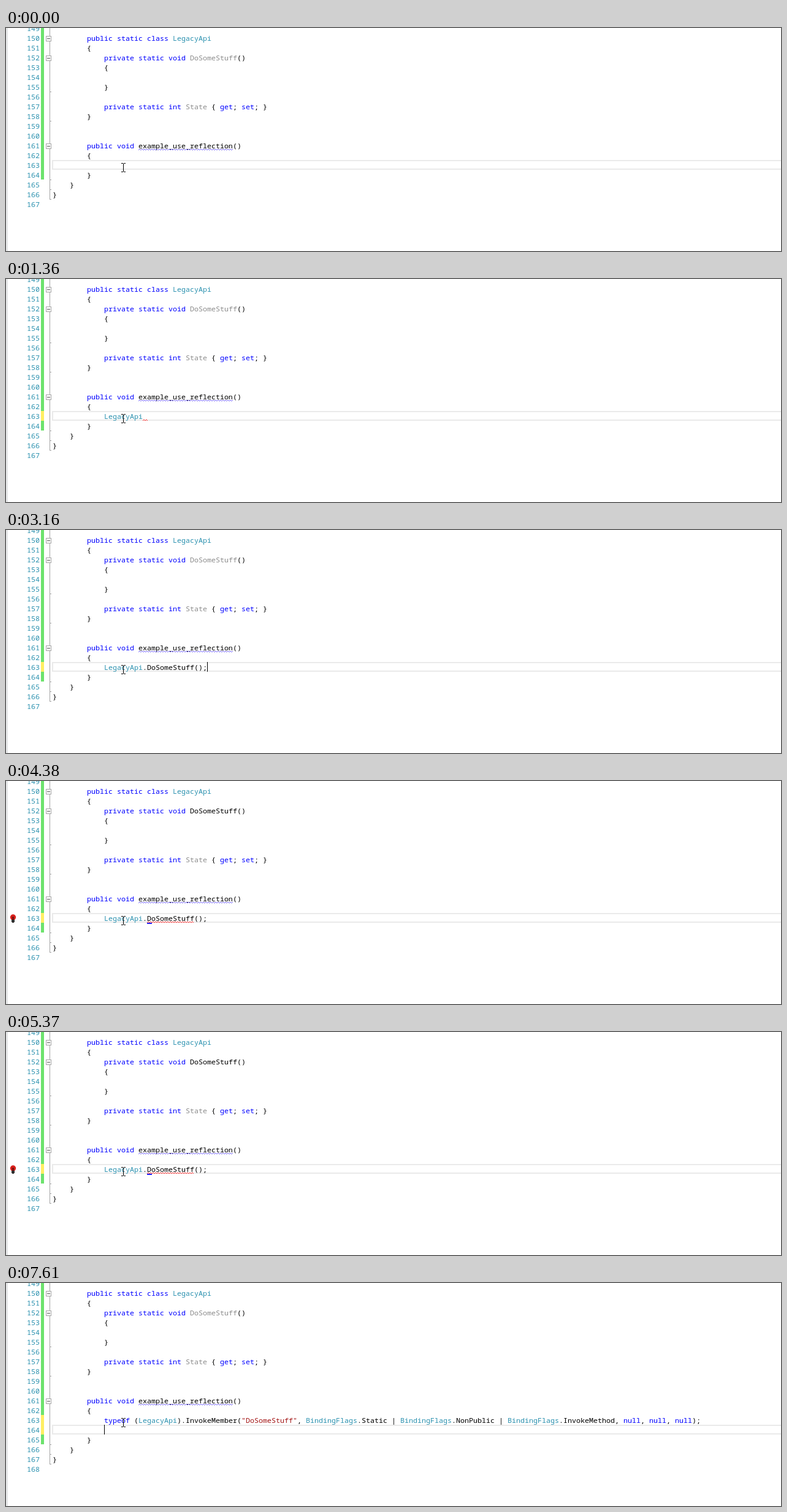
These frames come from a looping animation (1264 px wide and 365 px high, 8000 ms). An HTML page with a canvas:

```html
<!DOCTYPE html>
<html lang="en">
<head>
<meta charset="utf-8">
<title>Code editor</title>
<style>
  html, body { margin: 0; width: 100%; height: 100%; overflow: hidden; background: #fff; }
  canvas { display: block; }
</style>
</head>
<body>
<canvas id="stage" width="1264" height="365"></canvas>
<script>
const ctx = document.getElementById('stage').getContext('2d');
const LOOP = 8000, COL = 7, ROW = 16, LEFT = 76, CODE_X = 160, FIRST = 149;
const CODE_FONT = '11.667px "Noto Sans Mono", monospace';
const LIST_FONT = '11px "Open Sans", sans-serif';
const KEYWORDS = new Set('public private static class void int get set typeof null'.split(' '));
const TYPES = new Set(['LegacyApi', 'BindingFlags']);
const COLORS = { keyword: '#0000ff', type: '#2b91af', unused: '#8c8c8c', string: '#a31515' };

const HEAD = [
  '',
  '        public static class LegacyApi',
  '        {',
  '            private static void DoSomeStuff()',
  '            {',
  '',
  '            }',
  '',
  '            private static int State { get; set; }',
  '        }',
  '',
  '',
  '        public void example_use_reflection()',
  '        {'
];
const TAIL = ['        }', '    }', '}', ''];
const REFLECTION = 'typeof (LegacyApi).InvokeMember("DoSomeStuff", BindingFlags.Static | ' +
  'BindingFlags.NonPublic | BindingFlags.InvokeMethod, null, null, null);';
const CALL = 'LegacyApi.DoSomeStuff();';

const COMPLETIONS = [
  ['class', 'LegacyApi'], ['class', 'LabelExpression'], ['abstract', 'LambdaExpression'],
  ['class', 'LoopExpression'], ['struct', 'DataGridLength'],
  ['class', 'DataGridLengthConverter'], ['enum', 'DataGridLengthUnitType']
];
const FIXES = ["Make 'DoSomeStuff' public", "Make 'DoSomeStuff' internal",
  'Use reflection', "Create method 'DoSomeStuff'"];

// Each step changes only the listed properties; caret is an x position, 0 when hidden.
const STEPS = [
  [0, { code: '', caret: 0, edited: false, popup: '', error: null, bulb: '', used: false, extra: 0 }],
  [120, { code: 'L', caret: 167, edited: true }],
  [250, { code: 'Le', caret: 174 }],
  [390, { popup: 'list' }],
  [510, { code: 'Leg', caret: 181, popup: 'single' }],
  [790, { code: 'Lega', caret: 188 }],
  [930, { code: 'Legac', caret: 195 }],
  [1060, { code: 'LegacyApi', caret: 223, popup: '' }],
  [1360, { caret: 0, error: [223, 231] }],
  [1610, { code: 'LegacyApi.', caret: 230, error: null }],
  [1760, { error: [230, 237] }],
  [1890, { code: 'LegacyApi.D', caret: 237 }],
  [2040, { code: 'LegacyApi.Do', caret: 244 }],
  [2320, { code: 'LegacyApi.DoS', caret: 251 }],
  [2470, { code: 'LegacyApi.DoSo', caret: 258 }],
  [2770, { bulb: 'red' }],
  [2890, { popup: 'member' }],
  [3160, { code: CALL, caret: 328, popup: '', error: null, bulb: '' }],
  [3280, { used: true }],
  [3430, { error: [230, 307], bulb: 'red' }],
  [3840, { caret: 321 }],
  [3980, { caret: 314 }],
  [4110, { caret: 307 }],
  [4250, { caret: 300 }],
  [4380, { caret: 0 }],
  [4690, { caret: 293, popup: 'fixes' }],
  [5370, { caret: 0, popup: '' }],
  [5490, { code: REFLECTION, error: null, bulb: '' }],
  [5640, { used: false }],
  [5950, { caret: 1133 }],
  [6100, { bulb: 'yellow' }],
  [6410, { caret: 160, extra: 1 }],
  [6960, { caret: 0, bulb: '' }],
  [7610, { caret: 160 }]
];

const stateAt = t => Object.assign({}, ...STEPS.filter(s => s[0] <= t).map(s => s[1]));
const rowTop = line => (line - 150) * ROW + 8;

function box(color, x, y, w, h) {
  ctx.fillStyle = color;
  ctx.fillRect(x, y, w, h);
}

function frame(color, x, y, w, h, size = 1) {
  ctx.strokeStyle = color;
  ctx.lineWidth = size;
  ctx.strokeRect(x + size / 2, y + size / 2, w - size, h - size);
}

function label(text, x, y, color, font) {
  ctx.font = font;
  ctx.fillStyle = color;
  ctx.fillText(text, x, y);
}

function tokenColor(word, used) {
  if (word[0] === '"') return COLORS.string;
  if (KEYWORDS.has(word)) return COLORS.keyword;
  if (TYPES.has(word)) return COLORS.type;
  if (word === 'State' || (word === 'DoSomeStuff' && !used)) return COLORS.unused;
  return '#000';
}

function codeLine(text, x, line, used) {
  for (const m of text.matchAll(/"[^"]*"|\w+|[^\w"\s]+/g)) {
    label(m[0], x + m.index * COL, rowTop(line) + 13, tokenColor(m[0], used), CODE_FONT);
  }
}

function squiggle(color, x1, x2, y) {
  ctx.strokeStyle = color;
  ctx.lineWidth = 1;
  ctx.beginPath();
  for (let x = x1, up = 0; x <= x2; x += 2, up ^= 1) ctx.lineTo(x, y + (up ? -1 : 1));
  ctx.stroke();
}

function drawOutline(extra) {
  const gray = '#a5a5a5', shift = extra * ROW;
  box(gray, 71, 0, 1, 281 + shift);
  for (const y of [104, 152, 248 + shift, 264 + shift, 280 + shift]) box(gray, 71, y, 3, 1);
  for (const y of [17, 49, 193]) {
    box('#fff', 65, y - 4, 9, 9);
    frame(gray, 65, y - 4, 9, 9);
    box('#555', 67, y, 5, 1);
  }
}

function drawMargin(s) {
  box('#e6e7e8', 0, 0, 3, 365);
  box('#6ce26c', 57, 0, 5, 248 + s.extra * ROW);
  if (s.edited) box('#ffee62', 57, 216, 5, ROW * (1 + s.extra));
  for (let n = FIRST; n <= 167 + s.extra; n++) {
    label(n, 34, rowTop(n) + 13, COLORS.type, CODE_FONT);
  }
  drawOutline(s.extra);
}

function drawBulb(kind) {
  const red = kind === 'red';
  ctx.fillStyle = red ? '#d8201c' : '#f5c842';
  ctx.beginPath();
  ctx.arc(11.5, 223, 4.7, 0, 7);
  ctx.fill();
  box(red ? '#741411' : '#b48a20', 10, 222, 3, 5);
  box('#333', 9, 227, 5, 4);
  box('#333', 10, 231, 3, 1);
}

function drawMouse() {
  box('#000', 191, 222, 1, 13);
  for (const y of [221, 235]) {
    box('#000', 188, y, 3, 1);
    box('#000', 192, y, 3, 1);
  }
}

function diamond(x, y, r) {
  ctx.beginPath();
  ctx.moveTo(x - r, y);
  ctx.lineTo(x, y - r);
  ctx.lineTo(x + r, y);
  ctx.lineTo(x, y + r);
  ctx.fill();
}

function drawIcon(kind, x, y) {
  const orange = '#c27d1a';
  if (kind === 'struct') {
    box('#00539c', x - 5, y - 4, 5, 4);
    box('#00539c', x + 1, y - 4, 4, 3);
    box('#00539c', x - 5, y + 1, 4, 4);
    box('#00539c', x, y, 5, 5);
    box('#f6f6f6', x + 1, y + 2, 2, 1);
  } else if (kind === 'enum') {
    frame(orange, x - 5, y - 1, 6, 5);
    frame(orange, x, y - 3, 6, 5);
    box(orange, x - 3, y + 1, 2, 1);
    box(orange, x + 2, y - 1, 2, 1);
  } else if (kind === 'method') {
    ctx.fillStyle = '#68217a';
    diamond(x, y, 5);
  } else {
    ctx.fillStyle = orange;
    if (kind === 'abstract') label('A', x - 7, y, '#333', '7px "Open Sans", sans-serif');
    ctx.fillStyle = orange;
    diamond(x - 2, y - 2, kind === 'abstract' ? 3 : 4);
    box(orange, x, y - 1, 4, 1);
    box(orange, x + 1, y - 1, 1, 5);
    diamond(x + 4, y, 2.5);
    diamond(x + 3, y + 4, 2.5);
  }
}

// Matched letters are blue: a whole "Le", or the capitals L and E.
function matchedLabel(text, x, y) {
  const pattern = text.includes('Le') ? /(Le)/ : /([LE])/;
  ctx.font = LIST_FONT;
  for (const part of text.split(pattern)) {
    label(part, x, y, pattern.test(part) && part.length < 3 ? '#0000ff' : '#1e1e1e', LIST_FONT);
    x += ctx.measureText(part).width;
  }
}

function selectedItem(kind, text, x, right) {
  box('#3399ff', x + 24, 234, right - x - 25, 19);
  drawIcon(kind, x + 11, 243);
  label(text, x + 24, 247, '#fff', 'bold ' + LIST_FONT);
}

function panel(x, y, right, bottom) {
  box('#f6f6f6', x, y, right - x, bottom - y);
  frame('#cccedb', x, y, right - x, bottom - y);
}

function drawCompletions() {
  panel(136, 233, 385, 380);
  COMPLETIONS.forEach(([kind, text], i) => {
    const y = 243 + i * 19;
    if (!i) return selectedItem(kind, text, 136, 368);
    drawIcon(kind, 147, y);
    matchedLabel(text, 160, y + 4);
  });
  box('#e8e8ec', 367, 234, 17, 131);
  box('#c2c3c9', 371, 251, 9, 114);
  ctx.fillStyle = '#868999';
  ctx.beginPath();
  ctx.moveTo(371, 245);
  ctx.lineTo(375.5, 240);
  ctx.lineTo(380, 245);
  ctx.fill();
}

function drawFixes() {
  panel(0, 213, 30, 236);
  drawBulb('red');
  ctx.fillStyle = '#1e1e1e';
  ctx.beginPath();
  ctx.moveTo(20, 223);
  ctx.lineTo(26, 223);
  ctx.lineTo(23, 226);
  ctx.fill();
  panel(0, 235, 294, 313);
  box('#3399ff', 1, 274, 292, 19);
  FIXES.forEach((text, i) => {
    label(text, 28, 249 + i * 19, i === 2 ? '#fff' : '#1e1e1e', LIST_FONT);
  });
}

function drawPopup(kind) {
  if (kind === 'list') drawCompletions();
  if (kind === 'fixes') drawFixes();
  if (kind === 'single') {
    panel(136, 233, 368, 254);
    selectedItem('class', 'LegacyApi', 136, 368);
  }
  if (kind === 'member') {
    panel(206, 233, 317, 254);
    selectedItem('method', 'DoSomeStuff', 206, 317);
  }
}

function draw(s) {
  const caretTop = 216 + s.extra * ROW;
  box('#fff', 0, 0, 1264, 365);
  frame('#eaeaea', 75, caretTop, 1200, ROW, 2);
  drawMargin(s);
  HEAD.forEach((text, i) => codeLine(text, LEFT, FIRST + i, s.used));
  codeLine(s.code, CODE_X, 163, true);
  TAIL.forEach((text, i) => codeLine(text, LEFT, 164 + s.extra + i, s.used));
  squiggle('#7a6cff', 216, 370, 199);
  if (s.error) {
    squiggle('#ff3b3b', ...s.error, 231);
    if (s.code === CALL) box('#2020ff', 230, 232, 8, 2);
  }
  if (s.bulb) drawBulb(s.bulb);
  if (s.caret) box('#000', s.caret, caretTop, 1, ROW);
  drawMouse();
  drawPopup(s.popup);
}

const start = performance.now();
function tick() {
  draw(stateAt((performance.now() - start) % LOOP));
  requestAnimationFrame(tick);
}
tick();
</script>
</body>
</html>
```
